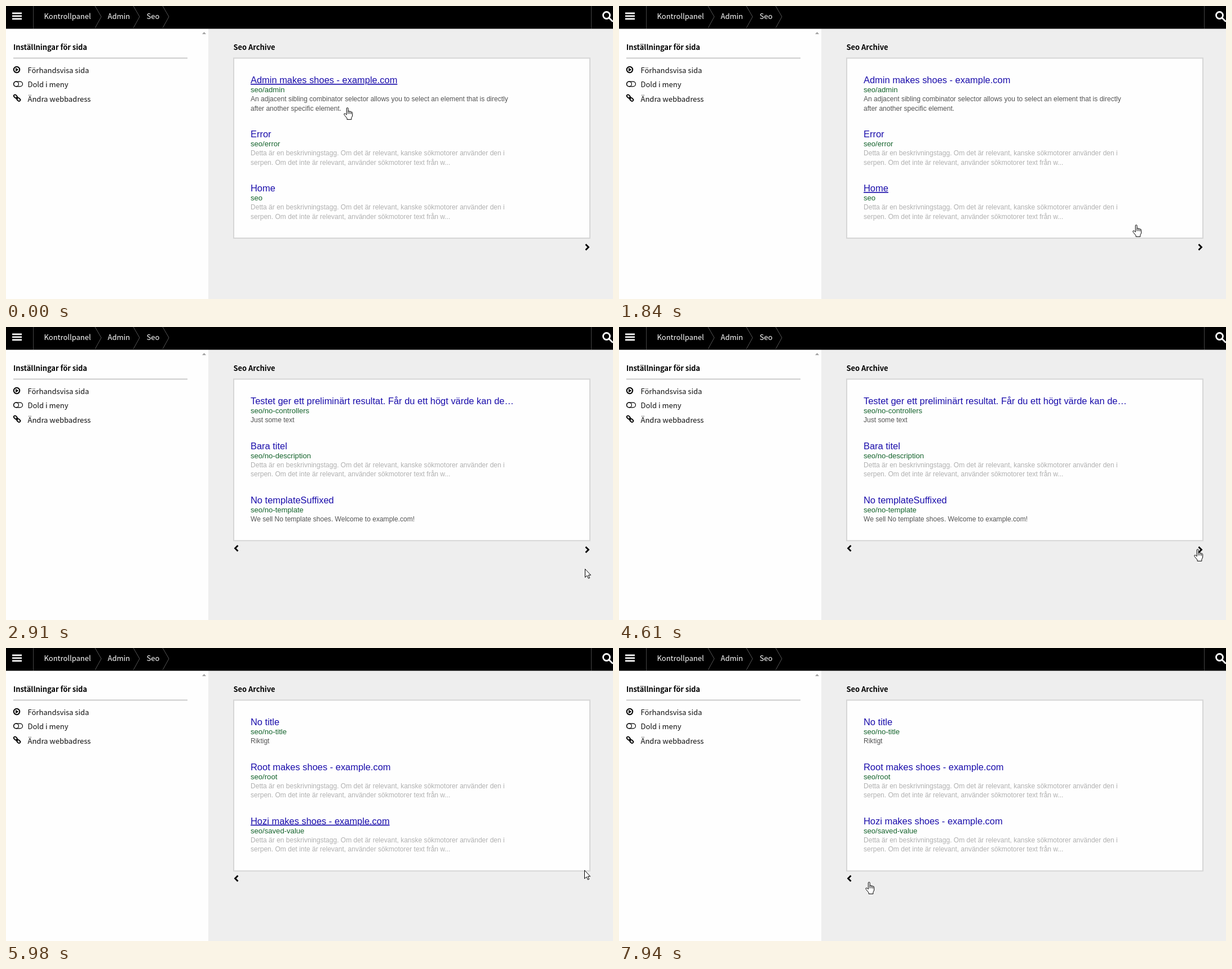
An HTML page for the animation above (8 s loop, 1077 by 520 pixels).

```html
<!DOCTYPE html>
<html lang="sv">
<head>
<meta charset="utf-8">
<title>Seo Archive</title>
<style>
html, body { margin: 0; width: 100%; height: 100%; overflow: hidden; background: #eee; }
svg { display: block; }
text { font: 12.04px Arial, "Liberation Sans", sans-serif; white-space: pre; }
.ui text { font: 13px "Noto Sans CJK JP", "Noto Sans CJK SC", "Noto Sans CJK", "Noto Sans", sans-serif; fill: #111; }
.ui .head { font-weight: 700; font-size: 12.9px; fill: #000; }
.ui .crumb { font-weight: 500; fill: #fff; }
.line { fill: none; stroke: #000; }
.title { font-size: 16.45px; fill: #1a0dab; text-decoration-skip-ink: none; }
.title.on { text-decoration: underline; }
.url { font-size: 13.1px; fill: #14632c; }
.desc { fill: #545454; }
.desc.auto { fill: #b0b0b0; }
</style>
</head>
<body>
<svg width="1077" height="520" viewBox="0 0 1077 520">
  <g class="ui">
    <rect y="40" width="359" height="480" fill="#fefefe"/>
    <rect width="1077" height="40.4"/>
    <path d="M11 12.8h17M11 17.8h17M11 22.8h17" class="line" style="stroke:#fff;stroke-width:2.8"/>
    <path d="M48.5 0V40M1038.5 0V40" class="line" style="stroke:#444"/>
    <path d="M158 0l11 19L158 39M226 0l11 19L226 39M278 0l11 19L278 39" class="line" style="stroke:#555"/>
    <text class="crumb" x="67.5" y="23.4">Kontrollpanel</text>
    <text class="crumb" x="180.5" y="23.4">Admin</text>
    <text class="crumb" x="249.5" y="23.4">Seo</text>
    <g class="line" style="stroke:#fff;stroke-width:2.8">
      <circle cx="1065.5" cy="16.5" r="6"/>
      <path d="M1070 21l6 6" stroke-linecap="round"/>
    </g>
    <path d="M348 50l3.5-4 3.5 4z" fill="#a3a3a3"/>
    <text class="head" x="13" y="78.4">Inställningar för sida</text>
    <path d="M13 92.5h309" class="line" style="stroke:#ccc;stroke-width:2"/>
    <circle cx="19" cy="113" r="5.2" class="line" stroke-width="2"/>
    <path d="M17 109.8v6.4l5.3-3.2z"/>
    <g class="line" stroke-width="1.2">
      <rect x="13.6" y="134.1" width="15.8" height="8.8" rx="4.4"/>
      <circle cx="18" cy="138.5" r="4.4"/>
    </g>
    <g class="line" stroke-width="1.8" transform="translate(19.5 163.2) rotate(45)">
      <rect x="-7.2" y="-2.3" width="7" height="4.4" rx="2"/>
      <rect x=".2" y="-2.3" width="7" height="4.4" rx="2"/>
      <path d="M-2.2 0h4.4"/>
    </g>
    <text x="38.5" y="118.6">Förhandsvisa sida</text>
    <text x="38.5" y="144.1">Dold i meny</text>
    <text x="38.5" y="169.6">Ändra webbadress</text>
    <text class="head" x="403.5" y="78.4">Seo Archive</text>
  </g>
  <g id="pages"></g>
  <g id="cursor" fill="#fff" stroke="#000" stroke-linejoin="round">
    <path id="arrow" d="M.5.5V15.3L4 12.1 6.4 17.2 8.6 16.3 6.3 11.3H10.6Z"/>
    <g id="hand" transform="translate(-5.7)">
      <path d="M5 13V2Q5 .5 6.4 .5T7.8 2V7.6Q8 6.3 9.3 6.3T10.6 7.8Q10.8 6.9 11.9 7T13.2 8.6Q13.4 7.8 14.3 8T15.4 9.6V14Q15.4 16 13.6 18.3V21.4H5.8V19.2L1 13.4Q.1 12 .8 11.2T3.2 11.4Z"/>
      <path d="M7.8 7.5V11.5M10.6 8V11.5M13.2 8.8V11.8" fill="none"/>
    </g>
  </g>
</svg>
<script>
const LOOP = 8000, TICK = 126;
const BOX = { left: 404, top: 92.5, width: 632 };
const LINE = 16.4, GAP = 63.2;
const AUTO = ["Detta är en beskrivningstagg. Om det är relevant, kanske sökmotorer använder den i",
  "serpen. Om det inte är relevant, använder sökmotorer text från w..."];

// Each result: title, address, description lines
const PAGES = [
  { from: 0, items: [
    ["Admin makes shoes - example.com", "seo/admin",
      ["An adjacent sibling combinator selector allows you to select an element that is directly",
       "after another specific element."]],
    ["Error", "seo/error", AUTO],
    ["Home", "seo", AUTO]] },
  { from: 2910, items: [
    ["Testet ger ett preliminärt resultat. Får du ett högt värde kan de…", "seo/no-controllers", ["Just some text"]],
    ["Bara titel", "seo/no-description", AUTO],
    ["No templateSuffixed", "seo/no-template", ["We sell No template shoes. Welcome to example.com!"]]] },
  { from: 5860, items: [
    ["No title", "seo/no-title", ["Riktigt"]],
    ["Root makes shoes - example.com", "seo/root", AUTO],
    ["Hozi makes shoes - example.com", "seo/saved-value", AUTO]] }
];

// Pointer strokes: each ends at a time and place after some even jumps, one per tick
const STROKES = [
  { end: 0, jumps: 1, x: 605, y: 180 },
  { end: 240, jumps: 2, x: 609, y: 273 },
  { end: 760, jumps: 4, x: 624, y: 344 },
  { end: 1180, jumps: 1, x: 737, y: 351 },
  { end: 1310, jumps: 1, x: 763, y: 354 },
  { end: 1570, jumps: 2, x: 876, y: 371 },
  { end: 1970, jumps: 3, x: 998, y: 421 },
  { end: 2360, jumps: 3, x: 1027, y: 429 },
  { end: 4190, jumps: 2, x: 1026, y: 409 },
  { end: 4460, jumps: 2, x: 1024, y: 398 },
  { end: 4610, jumps: 1, x: 1026, y: 394 },
  { end: 6820, jumps: 1, x: 1025, y: 394 },
  { end: 7120, jumps: 2, x: 975, y: 407 },
  { end: 7390, jumps: 2, x: 732, y: 415 },
  { end: 7790, jumps: 3, x: 466, y: 419 },
  { end: 7940, jumps: 1, x: 443, y: 415 }
];
// The pointer alternates between hand and arrow at these times
const SWAPS = [2630, 4340, 5980, 7940];

const $ = id => document.getElementById(id);

function add(parent, tag, attrs, content = "") {
  const el = document.createElementNS("http://www.w3.org/2000/svg", tag);
  for (const key in attrs) el.setAttribute(key, attrs[key]);
  el.textContent = content;
  return parent.appendChild(el);
}

function chevron(parent, x, y, dir) {
  add(parent, "path", { class: "line", "stroke-width": 2.8,
    d: `M${x - 2.5 * dir} ${y - 5}l${5 * dir} 5l${-5 * dir} 5` });
}

function build(page, index) {
  const g = page.el = add($("pages"), "g");
  const box = add(g, "rect", { x: BOX.left, y: BOX.top, width: BOX.width,
    fill: "#fefefe", stroke: "#d6d6d6", "stroke-width": 2 });
  let y = 137;
  page.results = page.items.map(([title, url, lines]) => {
    const el = add(g, "text", { class: "title", x: 434, y }, title);
    add(g, "text", { class: "url", x: 434, y: y + LINE }, url);
    lines.forEach((line, i) => add(g, "text",
      { class: lines === AUTO ? "desc auto" : "desc", x: 434, y: y + 32.2 + i * LINE }, line));
    const top = y - 20;
    y += GAP + lines.length * LINE;
    return { el, top };
  });
  page.bottom = y - 13;
  box.setAttribute("height", page.bottom - BOX.top);
  if (index > 0) chevron(g, 409, page.bottom + 13.5, -1);
  if (index < PAGES.length - 1) chevron(g, 1031, page.bottom + 16, 1);
}

const show = (el, on) => { el.style.display = on ? "" : "none"; };

function pointer(t) {
  const i = STROKES.findLastIndex(s => s.end - (s.jumps - 1) * TICK <= t);
  const to = STROKES[i], from = STROKES[i - 1] || to;
  const left = Math.max(0, Math.ceil((to.end - t) / TICK)) / to.jumps;
  return { x: to.x + (from.x - to.x) * left, y: to.y + (from.y - to.y) * left };
}

function draw(t) {
  const page = PAGES.findLast(p => p.from <= t);
  const { x, y } = pointer(t);
  const inside = x < BOX.left + BOX.width && y < page.bottom;
  const hovered = inside && page.results.findLast(r => r.top <= y);
  for (const p of PAGES) show(p.el, p === page);
  for (const r of page.results) r.el.classList.toggle("on", r === hovered);

  const isArrow = SWAPS.filter(s => s <= t).length % 2 === 1;
  show($("arrow"), isArrow);
  show($("hand"), !isArrow);
  $("cursor").setAttribute("transform", `translate(${Math.round(x)} ${Math.round(y)})`);
}

PAGES.forEach(build);
const start = performance.now();
function tick() {
  draw((performance.now() - start) % LOOP);
  requestAnimationFrame(tick);
}
tick();
</script>
</body>
</html>
```
